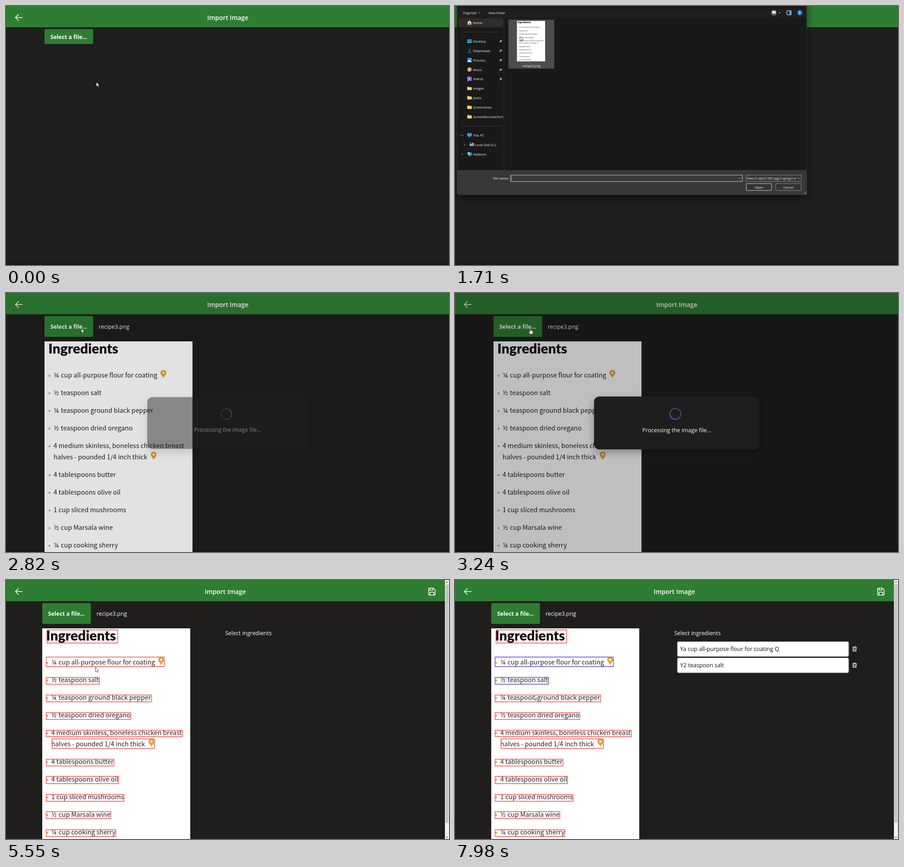
Recreate the animation shown at these times as an HTML page with a canvas. Size 978x573 px, loop 8000 ms.

```html
<!DOCTYPE html>
<html lang="en">
<head>
<meta charset="utf-8">
<title>Import Image</title>
<style>
html, body { margin: 0; width: 100%; height: 100%; overflow: hidden; background: #1e1e1e; }
canvas { display: block; width: 978px; height: 573px; }
</style>
</head>
<body>
<canvas id="stage" width="978" height="573"></canvas>
<script>
const c = document.getElementById('stage').getContext('2d');
const W = 978, H = 573, LOOP = 8000;
const UI = '"Open Sans","Noto Sans",sans-serif';
const BOOK = '"Noto Sans CJK JP","Noto Sans CJK SC","Noto Sans CJK","Noto Sans",sans-serif';
const GREEN = '#2e7d32', LIGHT = '#60ad5e', DARK = '#1e1e1e', AMBER = '#e8a33d';

// Times of the hard changes
const WAIT = 1200, READY = 1400, OPEN = 1600, OPENED = 1710, PICKED = 2220,
  CLOSING = 2420, CLOSED = 2520, ACTIVE = 2620, LOADED = 2720, MODAL = 2820,
  DONE = 4540, PICK1 = 6560, PICK2 = 7470;

// Pointer moves: start, end, number of steps, x, y
const moves = [
  [300, 1000, 8, 143, 67], [2110, 2220, 2, 166, 78], [4940, 5550, 7, 197, 193],
  [6250, 6360, 2, 188, 181], [6860, 7370, 6, 177, 227], [7770, 7980, 3, 174, 255]
];

// Ingredient lines: baseline, fraction, text, box left, top, right, bottom
const lines = [
  [80, '¼', 'cup all-purpose flour for coating', 8, 63, 269, 84],
  [119, '½', 'teaspoon salt', 8, 108, 126, 123],
  [158, '¼', 'teaspoon ground black pepper', 8, 147, 241, 162],
  [197, '½', 'teaspoon dried oregano', 8, 186, 195, 201],
  [236, '', '4 medium skinless, boneless chicken breast', 8, 225, 309, 239],
  [261, '', 'halves - pounded 1/4 inch thick', 21, 244, 247, 265],
  [300, '', '4 tablespoons butter', 8, 289, 158, 304],
  [339, '', '4 tablespoons olive oil', 8, 327, 168, 343],
  [378, '', '1 cup sliced mushrooms', 8, 367, 180, 382],
  [417, '½', 'cup Marsala wine', 8, 405, 151, 420],
  [456, '¼', 'cup cooking sherry', 8, 445, 162, 460]
];

function text(s, x, y, size, color = '#fff', weight = 400, font = UI, align = 'left') {
  c.font = `${weight} ${size}px ${font}`;
  c.textAlign = align;
  c.fillStyle = color;
  c.fillText(s, x, y);
}
function box(x, y, w, h, color, r = 0) {
  c.fillStyle = color;
  c.beginPath();
  c.roundRect(x, y, w, h, r);
  c.fill();
}
function frame(x, y, w, h, color, lw = 1, r = 0) {
  c.strokeStyle = color;
  c.lineWidth = lw;
  c.beginPath();
  c.roundRect(x, y, w, h, r);
  c.stroke();
}
function dot(x, y, r, color) {
  c.fillStyle = color;
  c.beginPath();
  c.arc(x, y, r, 0, 7);
  c.fill();
}
function stroke(d, color, lw) {
  c.strokeStyle = color;
  c.lineWidth = lw;
  c.lineCap = c.lineJoin = 'round';
  c.stroke(new Path2D(d));
}
function fill(d, color) {
  c.fillStyle = color;
  c.fill(new Path2D(d));
}
function at(x, y, draw, scale = 1) {
  c.save();
  c.translate(x, y);
  c.scale(scale, scale);
  draw();
  c.restore();
}

function stepped(t, a, b, n) {
  if (t < a) return 0;
  return Math.min(1, (Math.floor((t - a + 2) / ((b - a) / (n - 1))) + 1) / n);
}
function pointer(t) {
  let x = 199, y = 168;
  for (const [a, b, n, tx, ty] of moves) {
    const p = 1 - (1 - stepped(t, a, b, n)) ** 1.5;
    x += (tx - x) * p;
    y += (ty - y) * p;
  }
  return [x, y];
}

function arrowCursor() {
  const d = 'M.4 .4V10.2L2.7 8.1L4.3 11.6L6 10.9L4.4 7.5H7.3Z';
  fill(d, '#fff');
  stroke(d, '#111', .7);
}
function handCursor() {
  const d = 'M-.9 .9Q0-.6 .9 .9V5L2.7 5.2L4.4 5.6Q6 6 6 7.5V9.5L5 13H-.5L-3 8.8Q-3.5 7-2 7.3L-.9 8.5Z';
  fill(d, '#fff');
  stroke(d, '#222', .7);
}
function waitCursor() {
  c.strokeStyle = '#2b8fdc';
  c.lineWidth = 3;
  c.beginPath();
  c.arc(5, 5, 8, 0, 7);
  c.stroke();
}

function mapPin(x, y) {
  at(x, y, () => {
    fill('M0 18C-1.5 14-6.5 10.5-6.5 6.4A6.5 6.4 0 0 1 6.5 6.4C6.5 10.5 1.5 14 0 18Z', AMBER);
    dot(0, 6.4, 2.3, '#fff');
  });
}
function recipe() {
  box(0, 0, 326.7, 470, '#fff');
  text('Ingredients', 8.5, 26.5, 30.3, '#111', 900, 'Lato,"Open Sans",sans-serif');
  lines.forEach(([y, part, s, left]) => {
    if (left < 20) dot(11, y - 4, 2.2, AMBER);
    if (part) text(part, 20.5, y, 14.5, '#222');
    text(s, part ? 36 : 20, y, 14.25, '#222', 400, BOOK);
  });
  mapPin(262.5, 63);
  mapPin(241, 244);
}
function marks(t) {
  frame(10.5, 3.5, 156, 29, '#f44', 1.3);
  lines.forEach(([, , , l, top, r, b], i) => {
    const chosen = i == 0 && t >= PICK1 || i == 1 && t >= PICK2;
    frame(l + .5, top + .5, r - l, b - top, chosen ? '#5a3ccf' : '#f44', 1.3);
  });
}

function entry(y, s) {
  box(490.7, y, 378.6, 33.4, '#fff', 3);
  frame(491.1, y + .4, 377.8, 32.6, '#8b919c', .8, 3);
  text(s, 497, y + 21.2, 12.6, '#111');
  at(877, y + 11, () => stroke('M.5 2.2H10M3.4 2V.6H7.1V2M1.5 2.4L2 10.4H8.5L9 2.4M4 4.6V8.2M6.5 4.6V8.2', '#fff', 1.1));
}
function saveIcon() {
  at(932, 17, () => stroke('M1 3Q1 1 3 1H11.5L15.5 5V14.5Q15.5 16.5 13.5 16.5H3Q1 16.5 1 14.5ZM4 1V5.5H10.5V1.2M4 16.3V10H12.5V16.3', '#fff', 1.5));
}
function scrollbar() {
  box(969, 0, 9, H, '#f1f1f1');
  box(970, 10, 7, 527, '#c4c4c4');
  fill('M971 6L973.5 3L976 6Z', '#666');
  fill('M971 568L973.5 571L976 568Z', '#666');
}

function page(t, hover) {
  const done = t >= DONE, loaded = t >= LOADED, dx = done ? -5 : 0;
  box(0, 0, W, H, done ? '#1f1e1d' : DARK);
  if (!done) {
    const g = c.createLinearGradient(0, 568, 0, H);
    g.addColorStop(0, 'rgba(0,0,0,0)');
    g.addColorStop(1, 'rgba(0,0,0,.3)');
    box(0, 568, W, 5, g);
  }
  box(0, 0, W, 47, GREEN);
  stroke('M21 25.5H36M27.3 19L20.8 25.5L27.3 32', '#fff', 1.7);
  text('Import Image', done ? 484.2 : 489.8, 31, 13.9, '#fff', 600, UI, 'center');
  box(85 + dx, 51, 107.4, loaded ? 46 : 33, hover ? LIGHT : GREEN, 3);
  text('Select a file...', 138.5 + dx, loaded ? 79 : 72.5, 12.4, '#fff', 700, UI, 'center');
  if (loaded) {
    text('recipe3.png', 205 + dx, 79, 12.3);
    at(85 + dx, 107, recipe);
  }
  if (!done) return;
  at(80, 107, () => marks(t));
  text('Select ingredients', 484, 121.5, 12.45);
  if (t >= PICK1) entry(136, 'Ya cup all-purpose flour for coating Q');
  if (t >= PICK2) entry(172, 'Y2 teaspoon salt');
  saveIcon();
  scrollbar();
}

// Shadow around the panel only, so that a fading panel keeps its own tone
function panelShadow(x, y, w, h, r) {
  c.save();
  c.beginPath();
  c.rect(-W, -H, 2 * W, 2 * H);
  c.roundRect(x, y, w, h, r);
  c.clip('evenodd');
  c.shadowColor = 'rgba(0,0,0,.3)';
  c.shadowBlur = 18;
  c.shadowOffsetY = 7;
  box(x, y, w, h, DARK, r);
  c.restore();
}
function modal(t) {
  const tick = t < 3150 ? 2820 + Math.floor((t - 2820) / 110) * 110 : 3140 + Math.floor((t - 3140) / 100) * 100;
  const p = 1 - Math.pow(1 - Math.min(1, (tick - 2764) / 300), 3);
  box(0, 0, W, H, `rgba(0,0,0,${.25 * p})`);
  c.save();
  c.globalAlpha = p;
  c.translate(489.5, 287.5);
  c.scale(.95 + .05 * p, .95 + .05 * p);
  panelShadow(-182.5, -58.5, 365, 117, 12);
  box(-182.5, -58.5, 365, 117, DARK, 12);
  const mid = (75 + (tick - 2820) * .36 - 90) * Math.PI / 180;
  c.lineWidth = 2.1;
  c.lineCap = 'butt';
  for (const [color, a, b] of [['#4b5563', 0, 7], ['#2563eb', mid - .85, mid + .85]]) {
    c.strokeStyle = color;
    c.beginPath();
    c.arc(-3, -20, 12, a, b);
    c.stroke();
  }
  text('Processing the image file...', 0, 20.5, 12.3, '#fff', 400, UI, 'center');
  c.restore();
}

// Small sidebar icons, each in a 10 by 10 box
const icons = {
  home() { fill('M0 5L5 0L10 5L9 6V10H1V6Z', '#d9d3cc'); stroke('M.5 5L5 .8L9.5 5', '#e08a4a', 1.1); box(4, 6, 2.4, 4, '#8a5a3a'); },
  desktop() { box(0, 1, 10, 8, '#1e88d8', 1); box(0, 7.5, 10, 1.5, '#5cc3f5', .5); },
  down() { stroke('M5 .5V7M2.5 4.7L5 7.2L7.5 4.7M1 9.5H9', '#2fa7a0', 1); },
  picture() { box(0, 0, 10, 10, '#1f86e0', 1); fill('M0 9L4.5 4.5L10 9.5Z', '#fff'); dot(7, 3, 1, '#fff'); },
  music() { dot(5, 5, 5, '#d58a63'); stroke('M4.5 7V2.5L7 3.4', '#fff', 1); dot(3.7, 7, 1.1, '#fff'); },
  video() { box(0, 0, 10, 10, '#7d5bd0', 1); box(1, 0, 1, 10, '#cbbcf2'); fill('M4 3L7.5 5L4 7Z', '#fff'); },
  folder() { fill('M0 1.5H4L5 2.6H10V9H0Z', '#e9a92f'); box(0, 3.4, 10, 5.6, '#ffd36b', .6); },
  screen() { box(0, .8, 10, 7, '#2d9fe3', .6); box(3, 8.3, 4, 1, '#9ab'); },
  disk() { box(0, 4, 10, 4, '#aab4bd', .6); box(1, 1, 3, 2.4, '#36a4ee'); box(6, 1, 3, 2.4, '#ccd5dc'); dot(8, 6, .7, '#2d6'); },
  net() { box(1.5, 1.5, 8.5, 6.5, '#2d9fe3', .6); dot(3, 3, 2.6, '#8fd3f7'); box(4, 8.4, 4, 1, '#9ab'); }
};
const places = [
  ['home', 'Home', 37], ['desktop', 'Desktop', 78, 1], ['down', 'Downloads', 99, 1],
  ['picture', 'Pictures', 120, 1], ['music', 'Music', 141, 1], ['video', 'Videos', 161.5, 1],
  ['folder', 'images', 182.5], ['folder', 'posts', 203], ['folder', 'Screenshots', 224],
  ['folder', 'ScreenRecorderForW', 245], ['screen', 'This PC', 286],
  ['disk', 'Local Disk (C:)', 307], ['net', 'Network', 328]
];

function dialog(t) {
  const small = (s, x, y, align) => text(s, x, y, 7.3, '#f0f0f0', 400, UI, align);
  c.save();
  c.shadowColor = 'rgba(0,0,0,.5)';
  c.shadowBlur = 18;
  c.shadowOffsetY = 5;
  box(4, -20, 772.5, 437.5, '#191919', 4);
  c.restore();
  box(4, 5, 772, 21, '#1f1f1f');
  box(5, 363, 771, 54, '#383838', [0, 0, 4, 4]);
  frame(4.5, -10, 772, 427.5, '#454545', .8, 4);

  small('Organize', 17, 18);
  fill('M51.5 14L54.5 14L53 16Z', '#ccc');
  small('New folder', 74, 18);
  frame(699.5, 10.5, 9, 9, '#ddd', 1, 1);
  box(700.5, 11.5, 7, 5.5, '#fff');
  fill('M715 14L718.4 14L716.7 16.2Z', '#ddd');
  frame(732.5, 10.5, 10, 9, '#fff', 1, 1);
  box(738, 11, 4.5, 8, '#2f9be8');
  dot(761, 15, 5.4, '#1f8be8');
  text('?', 761, 18, 8, '#fff', 700, UI, 'center');

  box(7, 27, 99, 20, '#2d2d2d');
  box(107.5, 26, 1, 337, '#303030');
  box(12, 57, 90, 1, '#3a3a3a');
  box(12, 265, 90, 1, '#3a3a3a');
  c.save();
  c.beginPath();
  c.rect(5, 26, 101.5, 337);
  c.clip();
  places.forEach(([icon, name, y, pinned]) => {
    const indent = icon == 'disk' ? 5 : 0;
    at(27 + indent, y - 5.5, icons[icon]);
    small(name, 39.7 + indent * .85, y + 2.8);
    if (pinned) at(101, y, () => {
      stroke('M-3 3L-1 1', '#bbb', .8);
      fill('M-2.8 -.5L.2 2.8L1 1.2L3.2 -.8L.8 -3.2L-1.2 -1Z', '#aaa');
    });
  });
  c.restore();
  stroke('M13.5 285L16 287.5L18.5 285', '#ccc', .9);
  stroke('M20 304.7L22.3 307L20 309.3M15 325.7L17.3 328L15 330.3', '#aaa', .9);

  box(118, 30, 101, 108.5, '#4d4d4d');
  c.save();
  c.beginPath();
  c.rect(136.5, 33, 62.5, 89.5);
  c.clip();
  at(136.5, 33, recipe, .1917);
  c.restore();
  small('recipe3.png', 168.8, 134.5, 'center');

  small('File name:', 119, 384, 'right');
  frame(123, 374.2, 511.5, 14, '#c8c8c8');
  stroke('M626.5 380.2L628.7 382.4L630.9 380.2', '#ccc', .8);
  if (t >= PICKED) small('recipe3.png', 125, 384);
  else box(124.5, 376, .8, 10, '#eee');
  frame(642.5, 374.2, 122, 14, '#8a8a8a');
  c.save();
  c.beginPath();
  c.rect(643, 374, 109.5, 14);
  c.clip();
  text('Files (*.xbm;*.tif;*.pjp;*.apng;*.svg', 644, 384, 7.15, '#f0f0f0');
  c.restore();
  stroke('M757 380.2L759.2 382.4L761.4 380.2', '#ccc', .8);
  box(643, 393, 56, 15, '#333', 1);
  frame(643, 393, 56, 15, '#d0d0d0', 1, 1);
  small('Open', 671, 403.7, 'center');
  box(708, 393, 56, 15, '#333', 1);
  frame(708, 393, 56, 15, '#8f8f8f', 1, 1);
  small('Cancel', 736, 403.7, 'center');
  for (let i = 0; i < 3; i++)
    for (let j = 0; j <= i; j++) box(774 - 2 * j, 411 + 2 * i, 1.2, 1.2, '#aaa');
}

function draw(t) {
  const [x, y] = pointer(t);
  const left = t >= DONE ? 80 : 85;
  const over = x >= left && x <= left + 107 && y >= 51 && y <= (t >= LOADED ? 97 : 84);
  const busy = t >= MODAL && t < DONE;
  const blocked = busy || t >= OPEN && t < ACTIVE;
  page(t, over && !blocked);
  if (t >= OPEN && t < CLOSED) {
    c.save();
    c.globalAlpha = t < OPENED || t >= CLOSING ? .5 : 1;
    dialog(t);
    c.restore();
  }
  if (busy) modal(t);
  const waiting = t >= WAIT && t < READY;
  const hand = over && (t < WAIT || t >= 2930);
  at(x, y, waiting ? waitCursor : hand ? handCursor : arrowCursor);
}

let start;
function tick(now) {
  start ??= now;
  draw((now - start) % LOOP);
  requestAnimationFrame(tick);
}
requestAnimationFrame(tick);
</script>
</body>
</html>
```
